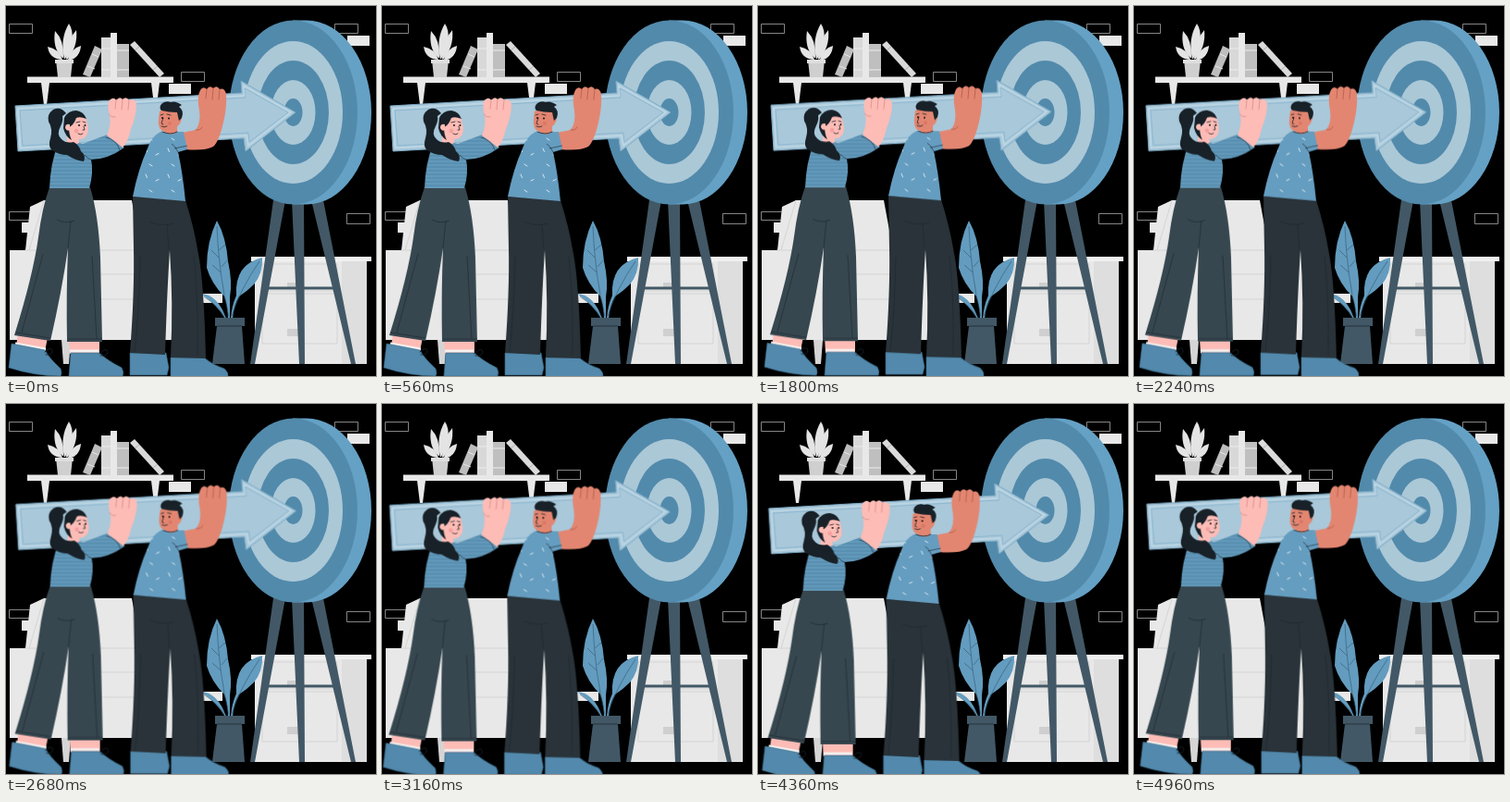
Recreate the animation shown at these times as an HTML page. Size 400x400 px, loop 5000 ms.

```html
<!DOCTYPE html>
<html lang="en">
<head>
<meta charset="utf-8">
<title>Aiming for the target</title>
<style>
  html, body { margin: 0; width: 100%; height: 100%; overflow: hidden; background: #000; }
  svg { display: block; width: 100vw; height: 100vh; }
  .sway { animation: sway 5s infinite cubic-bezier(.37, 0, .63, 1); }
  .bob { animation: bob 5s infinite linear; }
  @keyframes sway {
    0% { transform: translateX(0); }
    9% { transform: translateX(-1.2px); }
    35% { transform: translateX(4px); }
    70% { transform: translateX(-2.2px); }
    99.2%, 100% { transform: translateX(3.7px); }
  }
  @keyframes bob {
    0%, 11% { transform: translateY(0); animation-timing-function: ease-in-out; }
    35% { transform: translateY(-.8px); animation-timing-function: ease-in; }
    53.6% { transform: translateY(.5px); }
    73.6% { transform: translateY(2.6px); animation-timing-function: ease-out; }
    86% { transform: translateY(5px); animation-timing-function: ease-in-out; }
    99.2%, 100% { transform: translateY(.3px); }
  }
  .w { fill: #e8e8e8; }
  .g { fill: #cfcfcf; }
  .frame { fill: none; stroke: #a8a8a8; stroke-width: .8; }
  .crease { fill: none; stroke: #cccccc; stroke-width: .7; }
  .dark { fill: #425866; }
  .face { fill: #528aab; }
  .pale { fill: #abc8d7; }
  .leaf { fill: #639cbf; }
  .vein { fill: none; stroke: #31566d; stroke-width: .6; }
  .shoe { fill: #5289ac; stroke: #3a6a88; stroke-width: .6; }
  .hair { fill: #182128; }
  .rose { fill: #fdbcb6; }
  .tan { fill: #e38671; }
  .ink { fill: none; stroke: #1b252c; stroke-width: .8; stroke-linecap: round; }
  .seam { fill: none; stroke: #1d282f; stroke-width: .6; }
  .knuckle { fill: none; stroke: #dd8d8b; stroke-width: .8; stroke-linecap: round; }
  .knuckle.deep { stroke: #b05c4a; }
</style>
</head>
<body>
<svg viewBox="0 0 400 400" xmlns="http://www.w3.org/2000/svg">
  <defs>
    <pattern id="stripes" width="8" height="4" patternUnits="userSpaceOnUse">
      <path d="M0 0h8v4H0z" fill="#6299ba"/>
      <path d="M0 2h8" stroke="#4a7f9f" stroke-width=".8"/>
    </pattern>
    <pattern id="flecks" width="24" height="28" patternUnits="userSpaceOnUse" patternTransform="translate(147 148)">
      <path d="M0 0h24v28H0z" fill="#659dc0"/>
      <path d="M4 6l1.500 3.500M15 13l3-1.500M8 23l3 2" stroke="#d9e9f2" stroke-linecap="round"/>
    </pattern>
  </defs>
  <path d="M0 0h400v400H0z"/>

  <!-- wall bricks -->
  <path class="frame" d="M3.500 19.500h25v10h-25zM355.500 19.500h25v10h-25zM189.500 71.500h25v10h-25zM3.500 222.500h25v9h-25zM368.500 224.500h25v11h-25z"/>
  <path class="w" d="M369 32h24v11h-24zM176 84h24v11h-24zM17 234h20v11H17zM210 311h24v10h-24z"/>

  <!-- shelf -->
  <g>
    <path class="w" d="M23 76.500h158V83H23zM38 83h9l-3 24h-3zM157 83h9l-3 24h-3z"/>
    <g fill="#e4e4e4">
      <path d="M60 58Q47 57 45 44Q57 46 61 58z"/>
      <path d="M61 56Q50 46 53 27Q63 37 62 56z"/>
      <path d="M63 57Q58 36 68 19Q77 33 64 57z"/>
      <path d="M65 57Q65 38 76 26Q78 44 66 58z"/>
      <path d="M67 58Q70 46 81 43Q80 56 68 59z"/>
    </g>
    <path class="g" d="M54 58h18l-2 19H56z"/>
    <path fill="#dedede" d="M53 58h20v4H53z"/>
    <path fill="#bdbdbd" d="M83 74l13-31 8 4-13 30z"/>
    <path d="M88 65l8 3M93 52l7 3" stroke="#e5e5e5"/>
    <path fill="#d8d8d8" d="M103 34h10v43h-10z"/>
    <path class="w" d="M113 29h7v48h-7z"/>
    <path fill="#bfbfbf" d="M120 41h13v36h-13z"/>
    <path d="M103 46h10M103 69h10M120 48h13M120 69h13" stroke="#ececec"/>
    <path fill="#dadada" d="M134 42l5-4 32 35-5 4z"/>
    <path d="M139 48l5-4M159 69l5-4" stroke="#9f9f9f" stroke-width=".7"/>
  </g>

  <!-- armchair -->
  <g>
    <path class="w" d="M41 210h95l10 54h59v97H4v-97h17l5-47z"/>
    <path fill="#d5d5d5" d="M60 361h10l-2 26h-6z"/>
    <path class="crease" d="M25 264l16-54M20 264h184M98 290h48M98 317h48M40 264v97M146 264v97"/>
  </g>

  <!-- drawers -->
  <g>
    <path class="w" d="M269 276h121v111H269z"/>
    <path fill="#dedede" d="M363 276h27v111h-27z"/>
    <path fill="#f0f0f0" d="M265 271h130v5H265z"/>
    <path class="crease" d="M277 279h81v29h-81zM277 311h81v54h-81z"/>
    <path class="g" d="M304 299h13v6h-13zM304 349h13v8h-13z"/>
  </g>

  <!-- plant -->
  <g>
    <path class="leaf" d="M237 338Q229 324 211 311Q229 312 238 338z"/>
    <path class="leaf" d="M240 338Q240 324 236 314Q222 300 217 283Q217 254 228 232Q238 250 240 276Q245 298 242 315V338z"/>
    <path class="leaf" d="M243 338Q244 324 249 313Q247 279 277 272Q278 289 268 301Q261 308 252 314Q246 324 245 338z"/>
    <path class="vein" d="M228 238Q230 290 241 336M244 335Q254 305 274 276M214 314Q230 325 238 337M230 272l-8-8M230 264l7-6M232 288l-9-8M233 282l6-7"/>
    <path class="dark" d="M226 337h32v9h-32zM228 346h27l3 41h-35z"/>
    <path d="M228 346h27" stroke="#22323c"/>
  </g>

  <!-- target -->
  <g>
    <path class="dark" d="M289 210h13l-33 177h-5zM330 210h13l35 177h-5zM309 210h13l1 177h-6z"/>
    <path class="dark" d="M283 303.500h72v3h-72z"/>
    <path fill="#65a1c5" d="M310 15.500h15a70 99.500 0 0 1 0 199h-15z"/>
    <ellipse class="face" cx="310.500" cy="115" rx="69.500" ry="99.500"/>
    <ellipse class="pale" cx="310.500" cy="115" rx="53.500" ry="77"/>
    <ellipse class="face" cx="310.500" cy="115" rx="38.500" ry="56"/>
    <ellipse class="pale" cx="310.500" cy="115" rx="24" ry="35"/>
    <ellipse class="face" cx="310.500" cy="115" rx="10" ry="15"/>
  </g>

  <g class="sway"><g class="bob">
    <!-- arrow -->
    <g>
      <path d="M10 108L255 94 254 81 313 115 259 157 257 143 13 157z" fill="#a9c8da" stroke="#7dabc5"/>
      <path d="M13 111L258 97 257 86 308 115 262 151 260 140 15.500 153.500z" fill="none" stroke="#bcd6e4" stroke-width="2"/>
      <path d="M15 113L259 99 258 89 305 115 263 147 262 137 18 151z" fill="none" stroke="#7badc9" stroke-width=".6"/>
    </g>

    <!-- man -->
    <g>
      <path class="shoe" d="M134 375h39l3 16-2 8h-40z"/>
      <path class="shoe" d="M178 380h36q9 8 22 12 5 4 4 10h-62z"/>
      <path fill="#293339" d="M137 206L194 210Q203 238 208 268Q214 298 216 381L178 380Q181 320 177 264Q174 310 172 377L134 375Q139 310 138 262z"/>
      <path class="seam" d="M174 236l2 27M155 233q12 6 26 2M203 270q5 42 4 108M145 270q-1 60-6 104"/>
      <path class="tan" d="M190 137L205 134Q211 126 209 113Q206 98 210 91Q213 86 217 90Q220 85 224 89Q228 85 231 90Q236 88 238 95Q239 109 235 126Q230 147 224 152Q215 157 193 155z"/>
      <path class="knuckle deep" d="M217 90l-1 10M224 89l-1 12M231 90l-1 11M205 134q5 1 7-3"/>
      <path fill="url(#flecks)" d="M167 136L192 136 196 155 186 158Q191 180 194 211L137 206Q143 176 153 154Q157 141 167 136z"/>
      <path class="seam" d="M196 151l-14 3M186 158q-3-7-7-9"/>
      <path class="tan" d="M171 126v10q8 5 14 0v-8z"/>
      <path class="ink" d="M169 136q9 4 16 0" stroke-width="2"/>
      <path class="tan" d="M166 114Q175 107 188 112L190 121Q189 129 182 132Q176 138 169 135Q164 132 165 122z"/>
      <path class="hair" d="M168 113Q165 110 168 106Q172 102 178 104Q183 102 190 107L187 109Q193 113 190 121L187 124 185 115Q176 115 168 113z"/>
      <path class="ink" d="M167 118l3-1M174 117l4 1M170 121l-2 6 2 1M168 130q3 2 6 0"/>
      <circle cx="169" cy="121" r=".9"/><circle cx="176" cy="121.500" r=".9"/>
      <circle cx="177" cy="127" r="2" fill="#d66558" opacity=".5"/>
    </g>

    <!-- woman -->
    <g>
      <path class="rose" d="M13 354h33l-4 19-31-5zM68 359h33v17H69z"/>
      <path d="M10 365l33 6M69 373h31" stroke="#f5f0ef" stroke-width="3"/>
      <path class="shoe" d="M6 365l36 7q4 8 17 20 2 5 0 8-28 0-56-9z"/>
      <path class="shoe" d="M70 375h31q8 8 24 16 3 5 1 9H68z"/>
      <path class="ink" d="M42 374q7-7 8-1q0 5-7 4M101 376q8-8 9-2q0 5-8 4"/>
      <path fill="#37474f" d="M47 196H91Q100 226 102 272L104 363H66Q65 310 67 262Q60 310 48 362L9 356Q29 292 35 250Q39 218 47 196z"/>
      <path class="seam" d="M70 232l-3 30M55 231q10 5 19 1M93 270l5 90M40 268L17 353M10 353l38 6M67 360h37"/>
      <path fill="url(#stripes)" d="M56 150Q69 144 83 149L112 138 128 153Q110 166 92 166Q95 180 90 197H47Q48 170 56 150z"/>
      <path class="seam" d="M92 166q-4-1-7-5M108 142q12 3 15 14"/>
      <path class="rose" d="M109 140Q115 126 111 114Q109 103 113 101Q117 98 119 102Q123 97 126 101Q130 97 133 102Q139 99 141 106Q141 119 135 133Q132 147 126 153Q118 146 109 140z"/>
      <path class="knuckle" d="M119 102l-1 9M126 101l-1 11M133 102l-1 10M111 117q3 4 7 3"/>
      <path class="rose" d="M66 134h12l1 14q-7 4-13-1z"/>
      <path class="rose" d="M67 120Q77 114 86 120Q88 126 89 132Q89 142 81 144Q71 144 67 135z"/>
      <path class="hair" d="M63 121Q67 113 76 113Q84 114 87 122Q80 119 76 121Q73 129 68 131Q68 139 71 145Q64 141 62 132z"/>
      <path class="hair" d="M65 116Q59 108 51 112Q44 117 46 125Q51 133 48 143Q45 152 50 156Q57 161 66 161Q75 167 84 168Q87 162 81 157Q79 150 73 147Q65 149 60 144Q54 139 59 130Q62 124 61 119z"/>
      <path class="rose" d="M69 128q-5-1-5 4 2 4 5 2z"/>
      <path class="ink" d="M76 126l4-1M83 125l3 1M84 130l1 4-2 0M78 138q3 2 5 0" stroke-width=".6"/>
      <circle cx="79" cy="129" r=".9"/><circle cx="85.500" cy="129" r=".9"/>
      <circle cx="76" cy="135" r="2.200" fill="#ed8489" opacity=".5"/>
    </g>
  </g></g>
</svg>
</body>
</html>
```
